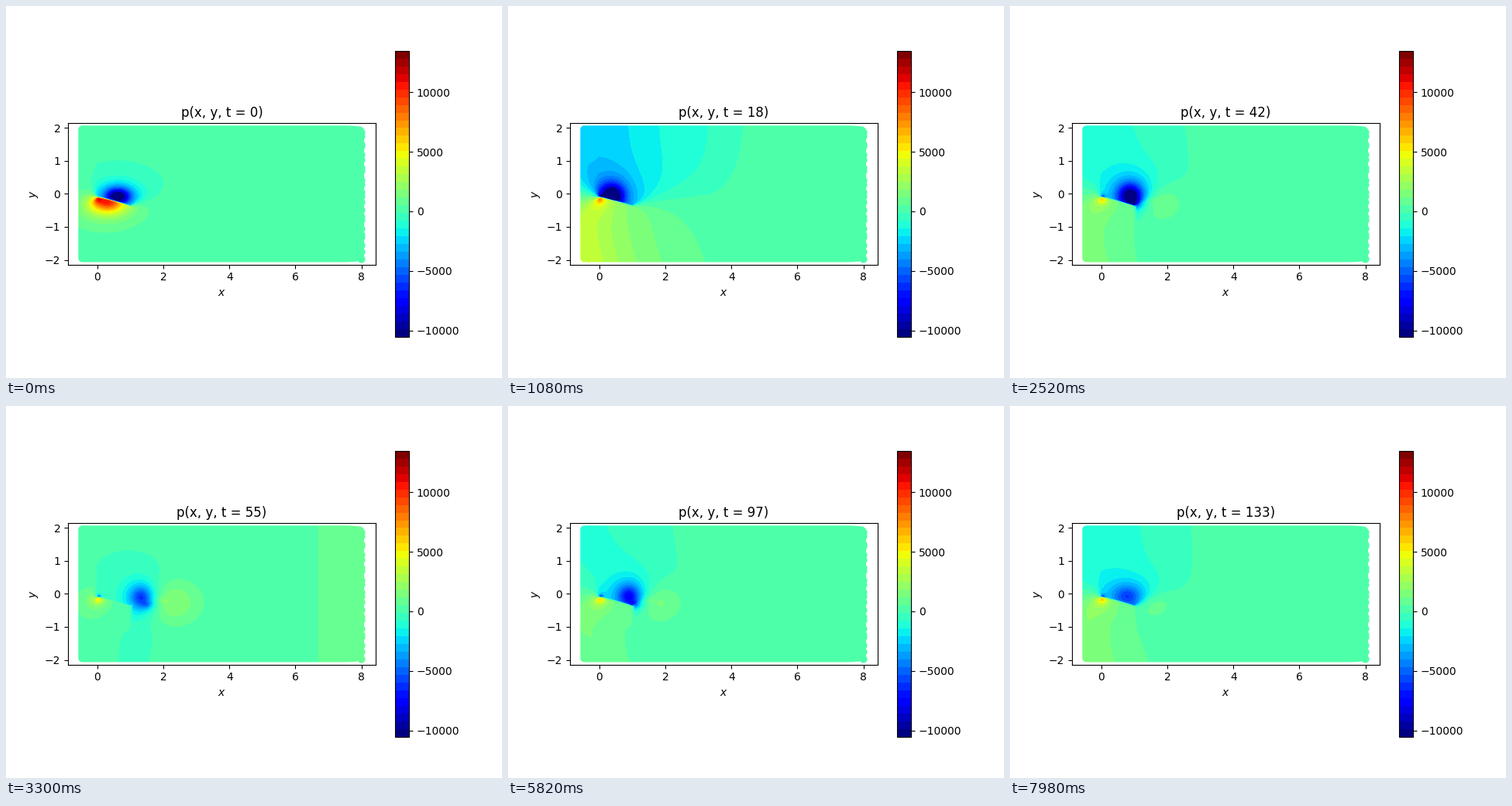
Recreate the animation shown at these times as a matplotlib script. Size 640x480 px, loop 8000 ms.

```python
import numpy as np
import matplotlib.pyplot as plt
from matplotlib.animation import FuncAnimation
from matplotlib.cm import ScalarMappable
from matplotlib.colors import Normalize

VMIN, VMAX, LEVELS = -10554, 13485, 37
STEP_MS, TICK_MS, LOOP_MS = 60, 20, 8000

fig = plt.figure(figsize=(6.4, 4.8), dpi=100)
ax = fig.add_subplot()
ax.set_aspect("equal")
ax.set_xlim(-0.89, 8.425)
ax.set_ylim(-2.145, 2.145)
ax.set_xlabel("$x$")
ax.set_ylabel("$y$")
title = ax.set_title("p(x, y, t = 0)")
cmap = plt.get_cmap("jet", LEVELS)
fig.colorbar(ScalarMappable(Normalize(VMIN, VMAX), cmap), ax=ax)
lut = (cmap(np.arange(LEVELS)) * 255).round().astype(np.uint8)

# Pixel window of the field, and the data coordinates of its pixels
LEFT, TOP, W, H = 92, 152, 374, 180
px, py = np.meshgrid(LEFT + 0.5 + np.arange(W), TOP + 0.5 + np.arange(H))
X = (px - 80) / 42.6 - 0.89
Y = (242.4 - py) / 42.6


def ramp(z):
    """Smooth step from 0 to 1."""
    z = np.clip(z, 0, 1)
    return z * z * (3 - 2 * z)


def sigmoid(z):
    return 0.5 + 0.5 * np.tanh(z / 2)


def pulse(t, mid, width):
    return np.exp(-(((t - mid) / width) ** 2))


def blob(cx, cy, sx, sy):
    """Peaked spot with a slow tail."""
    r2 = ((X - cx) / sx) ** 2 + ((Y - cy) / sy) ** 2
    return (1 + 0.45 * r2) ** -1.75


def bell(cx, cy, sx, sy):
    return pulse(X, cx, sx) * pulse(Y, cy, sy)


def dot_cover():
    """Coverage of the overlapping round markers, ragged at the outlet."""
    r = 5.0
    sag = 1.5 * np.clip((px - 435) / 25, 0, 1) ** 2
    dx = np.maximum(np.maximum(98.3 - px, px - 457), 0)
    dy = np.maximum(np.maximum(159.3 + sag - py, py - 325.5 + sag), 0)
    dist = np.hypot(dx, dy)
    rng = np.random.default_rng(4)
    for cy in np.linspace(160.5, 324, 22) + rng.uniform(-3, 3, 22):
        dist = np.minimum(dist, np.hypot(px - 458.6, py - cy))
    return np.clip(r + 0.5 - dist, 0, 1)


# Split of the plane by the foil: 1 on the suction side, 0 on the other
xc = np.clip(X, 0, 1)
foil = -0.09 - 0.2 * xc - 0.07 * xc**2 + np.clip(0.25 * (X - 1), 0, 0.5)
blur = 0.015 + 0.9 * np.maximum(-X, 0) + 0.42 * np.maximum(X - 1, 0)
above = sigmoid(2 * (Y - foil) / blur)
below = 1 - above
behind = np.clip((X - 0.98) / 0.1, 0, 1)
nose = np.maximum(below, np.clip(-X / 0.15, 0, 1))

NOSE_TIGHT = nose * blob(0.02, -0.17, 0.13, 0.11)
NOSE_WIDE = nose * blob(-0.1, -0.2, 0.45, 0.4)
NOSE_DIP = above * blob(0.05, -0.07, 0.05, 0.04)
START_PUSH = below * blob(0.35, -0.25, 0.42, 0.27)
START_PULL = above * blob(0.62, -0.08, 0.33, 0.22)

# Birth time, strength and stretch of the vortices shed over the foil
VORTICES = [(0, 12500, 1.0), (54, 8000, 1.0), (95, 5200, 1.35)]


def far_field(t):
    """Pressure above and below in step with the lift, in thousands."""
    lift = np.interp(t, [0, 9, 28, 55, 75, 97, 133],
                     [0, 3.7, 2.5, 0.1, 2.0, 1.0, 1.45])
    reach = 1 + 0.8 * lift
    top = 0.42 * (sigmoid((reach - X) / 0.45) + sigmoid((1 - X) / 0.4))
    lean = X + 0.3 * (Y + 2)
    bottom = 1.3 / (0.25 + np.exp(lean / (0.7 + 0.27 * lift)))
    return 1000 * lift * (below * np.minimum(bottom, 1.05) - above * top)


def vortex(age, power, stretch):
    """A vortex rolling along the foil, with its eddy and recovery zone."""
    cx = 0.021 * age + 0.035 * max(age - 50, 0)
    cy = -0.07 - 0.13 * np.clip(cx - 1.1, 0, 1.2)
    size = 0.2 + 0.14 * (1 - np.exp(-age / 20))
    v = power * ramp(age / 10) * (1 - ramp((age - 35) / 42))
    free = np.maximum(above, behind * np.clip((cx - 0.7) / 0.3, 0, 1))
    p = -v * free * blob(cx, cy, size * stretch, size)

    eddy = 4200 * pulse(age, 48, 8)
    p -= eddy * np.maximum(above, behind) * blob(cx + 0.17, -0.33, 0.14, 0.1)

    wake = pulse(age, 52, 14)
    spread = 0.1 + 0.75 * np.sqrt(wake)
    p += 2200 * wake * bell(cx + 0.85, -0.25, spread, 0.8 * spread)
    return p + 1000 * wake * blob(cx + 0.65, -0.2, 0.12, 0.08)


def pressure(t):
    start = max(0, 1 - t / 6)
    p = far_field(t)
    p += 3800 * NOSE_TIGHT + 1200 * NOSE_WIDE
    p += start * (9500 * START_PUSH - 12500 * START_PULL)
    p -= (1 - start) * 4000 * NOSE_DIP
    for birth, power, stretch in VORTICES:
        if t > birth:
            p += vortex(t - birth, power, stretch)

    # Slack phase: a low column under the foil and a rise at the outlet
    p += pulse(t, 55, 7) * (11 * X**2 - 300 * below * pulse(X, 1, 0.7))
    # Starting vortex nearing the outlet
    p -= 430 * pulse(t, 75, 8) * bell(1 + 0.081 * t, -0.4, 1.02, 0.55)
    return p


cover = (dot_cover() * 255).astype(np.uint8)
picture = fig.figimage(np.zeros((H, W, 4), np.uint8), LEFT, 480 - TOP - H,
                       origin="upper", zorder=1)


def update(i):
    t = i * TICK_MS // STEP_MS
    level = (pressure(t) - VMIN) / (VMAX - VMIN) * LEVELS
    img = lut[np.clip(level, 0, LEVELS - 1).astype(int)]
    img[..., 3] = cover
    picture.set_data(img)
    title.set_text(f"p(x, y, t = {t})")
    return picture, title


anim = FuncAnimation(fig, update, frames=LOOP_MS // TICK_MS, interval=TICK_MS,
                     repeat=True, repeat_delay=0, blit=False)
plt.show()
```
